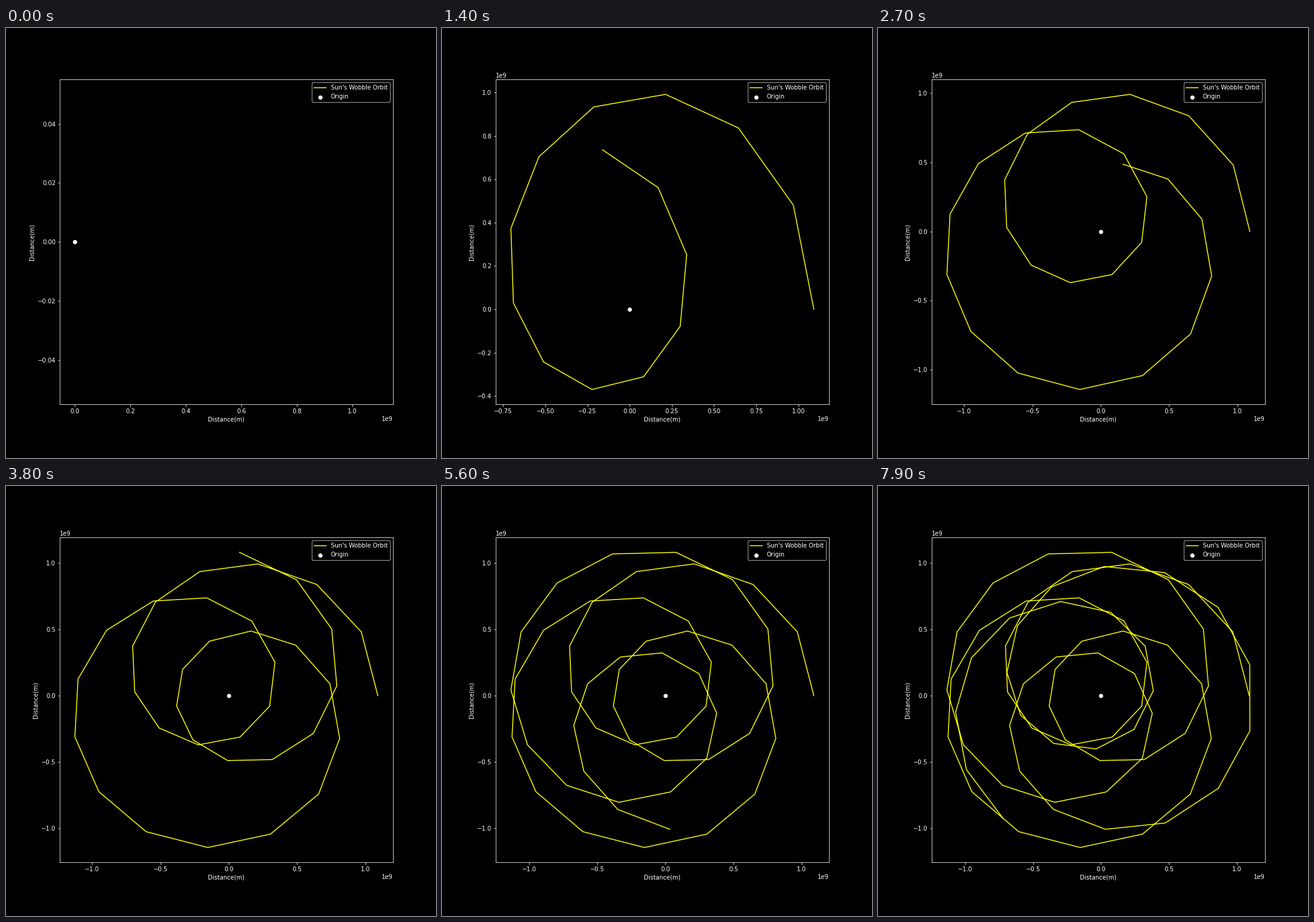
A matplotlib script that plays this animation: 720x720 px, repeating every 8 s.

```python
import numpy as np
import matplotlib.pyplot as plt
from matplotlib.animation import FuncAnimation

YEARS = 80
STEP_MS = 100


def kepler(t, a, e, period):
    """Complex position on an ellipse, starting at the closest point."""
    mean = 2 * np.pi * t / period
    ecc = mean.copy()
    for _ in range(8):
        ecc = mean + e * np.sin(ecc)
    return a * (np.cos(ecc) - e + 1j * np.sqrt(1 - e * e) * np.sin(ecc))


def wobble(t):
    """Pull of the two giant planets plus a slow drift, in metres."""
    inner = kepler(t, 0.7431, 0.0504, 11.902)
    outer = kepler(t, 0.4090, 0.05617, 29.65)
    drift_x = 8.2e-6 * t**2 + 3.1e-8 * t**3
    drift_y = -7.2e-4 * t + 3.4e-6 * t**2
    return 1e9 * (inner + outer + drift_x + 1j * drift_y)


path = wobble(np.arange(YEARS, dtype=float))

plt.style.use("dark_background")
plt.rcParams["font.family"] = "DejaVu Sans"
fig, ax = plt.subplots(figsize=(10, 10), dpi=72)
fig.subplots_adjust(left=0.125, right=0.9, bottom=0.125, top=0.88)


def draw(year):
    # Redrawing from scratch lets the axes rescale to the trail so far
    ax.clear()
    trail = path[:year + 1]
    ax.plot(trail.real, trail.imag, color="yellow", lw=1.5,
            label="Sun's Wobble Orbit")
    ax.scatter([0], [0], color="white", label="Origin")
    ax.set_xlabel("Distance(m)")
    ax.set_ylabel("Distance(m)")
    ax.legend(loc="upper right")


anim = FuncAnimation(fig, draw, frames=YEARS, interval=STEP_MS, repeat=True)
plt.show()
```
